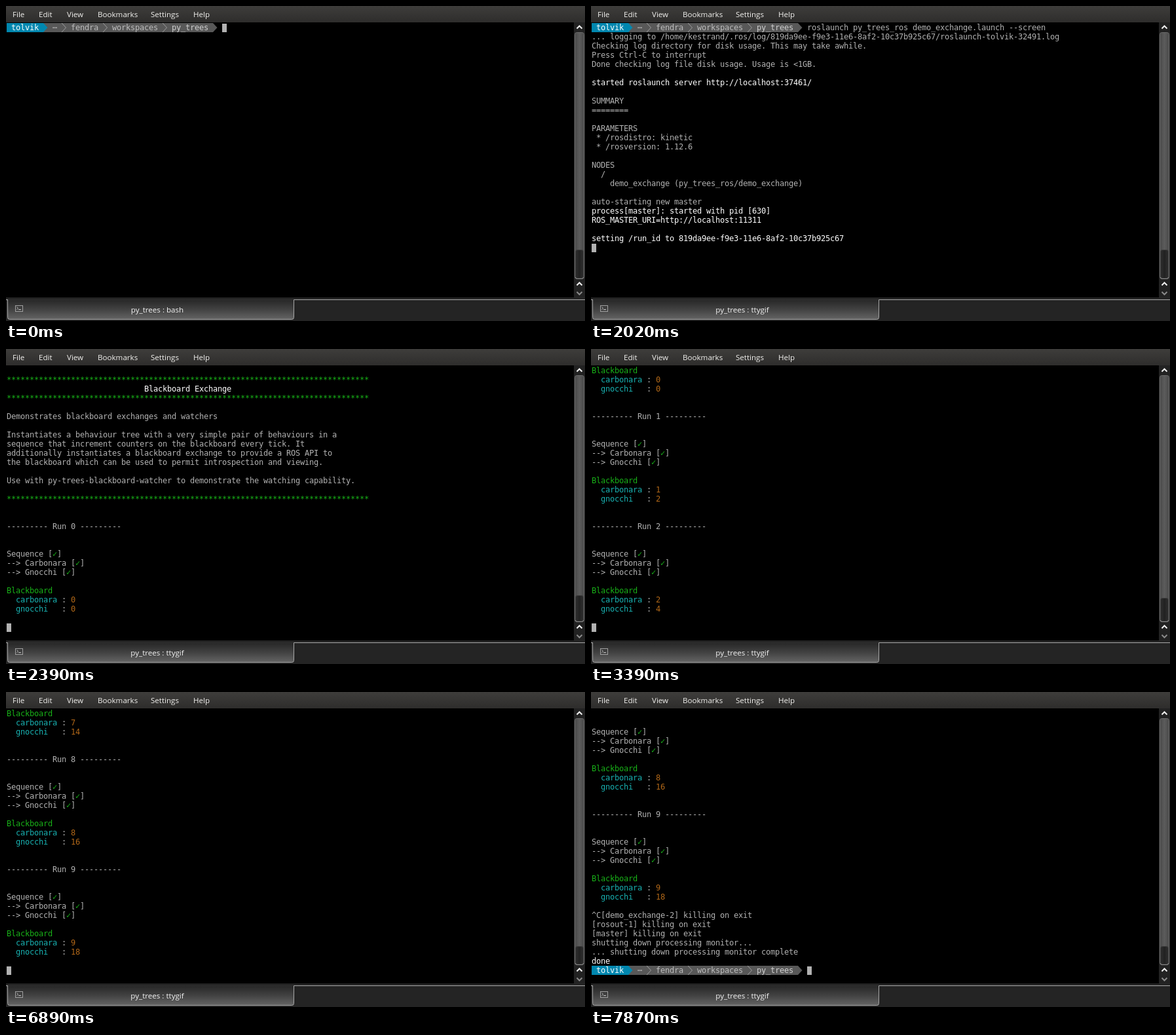
Recreate the animation shown at these times as an HTML page with a canvas. Size 884x481 px, loop 8000 ms.

```html
<!DOCTYPE html>
<html lang="en">
<head>
<meta charset="utf-8">
<title>Terminal session</title>
<style>
  html, body { margin: 0; width: 100%; height: 100%; overflow: hidden; background: #000; }
  canvas { display: block; }
</style>
</head>
<body>
<canvas id="stage" width="884" height="481"></canvas>
<script>
const ctx = document.getElementById('stage').getContext('2d');
const LOOP = 8000, ROWS = 29, CELL_W = 7, CELL_H = 14, LEFT = 1, TOP = 26;
const MONO = '12px "DejaVu Sans Mono", monospace';
const SANS = '11.6px "Open Sans", "Noto Sans", sans-serif';
const HOST = 'tolvik', FOLDER = 'fendra', HOME = 'kestrand';

// "~" plus a letter switches the text colour; "~P" draws the shell prompt.
const COLORS = { n: '#b2b2b2', w: '#ffffff', g: '#18b218', c: '#18b2b2', o: '#b26818' };
const PROMPT_COLS = 47;

const events = [[0, '~P']];
const add = (time, ...lines) => events.push([time, lines.join('\n')]);

const command = 'roslaunch py_trees_ros demo_exchange.launch --screen';
const KEYS = 9;
const typed = k => Math.round(command.length * k / KEYS);
for (let k = 0; k < KEYS; k++) add(350 + 100 * k, command.slice(typed(k), typed(k + 1)));

const runId = '819da9ee-f9e3-11e6-8af2-10c37b925c67';
const stars = '~g' + '*'.repeat(79);
add(1390, '', '');
add(1540, `... logging to /home/${HOME}/.ros/log/${runId}/roslaunch-${HOST}-32491.log`,
  'Checking log directory for disk usage. This may take awhile.',
  'Press Ctrl-C to interrupt', '');
add(1640, 'Done checking log file disk usage. Usage is <1GB.', '', '');
add(1730, '~wstarted roslaunch server http://localhost:37461/', '',
  'SUMMARY', '========', '',
  'PARAMETERS', ' * /rosdistro: kinetic', ' * /rosversion: 1.12.6', '',
  'NODES', '  /', '    demo_exchange (py_trees_ros/demo_exchange)', '', '');
add(1820, 'auto-starting new master', '~wprocess[master]: started with pid [630]', '');
add(2020, '~wROS_MASTER_URI=http://localhost:11311', '', `~wsetting /run_id to ${runId}`, '');
add(2100, '~wprocess[rosout-1]: started with pid [643]', 'started core service [/rosout]', '');
add(2180, '~wprocess[demo_exchange-2]: started with pid [650]', '');
add(2260, '', stars, ' '.repeat(30) + '~wBlackboard Exchange', stars, '',
  'Demonstrates blackboard exchanges and watchers', '',
  'Instantiates a behaviour tree with a very simple pair of behaviours in a',
  'sequence that increment counters on the blackboard every tick. It',
  'additionally instantiates a blackboard exchange to provide a ROS API to',
  'the blackboard which can be used to permit introspection and viewing.', '',
  'Use with py-trees-blackboard-watcher to demonstrate the watching capability.', '',
  stars, '', '');

for (let n = 0; n < 10; n++) {
  add(2390 + 500 * n, '', `--------- Run ${n} ---------`, '', '',
    'Sequence [~g✓~n]', '--> Carbonara [~g✓~n]', '--> Gnocchi [~g✓~n]', '',
    '~gBlackboard', `  ~ccarbonara ~n: ~o${n}`, `  ~cgnocchi   ~n: ~o${2 * n}`, '', '');
}

add(7040, '^C');
add(7100, '[demo_exchange-2] killing on exit', '');
add(7300, '[rosout-1] killing on exit', '');
add(7500, '[master] killing on exit', '');
add(7700, 'shutting down processing monitor...',
  '... shutting down processing monitor complete', '~wdone', '');
add(7870, '~P');

const cellX = col => LEFT + col * CELL_W;

function rect(x, y, w, h, fill) {
  ctx.fillStyle = fill;
  ctx.fillRect(x, y, w, h);
}

function path(points, color, width) {
  ctx.beginPath();
  points.forEach(([x, y]) => ctx.lineTo(x, y));
  if (width) {
    ctx.strokeStyle = color;
    ctx.lineWidth = width;
    ctx.stroke();
  } else {
    ctx.fillStyle = color;
    ctx.fill();
  }
}

function roundBox(x, y, w, h, radii, fill, stroke) {
  ctx.beginPath();
  ctx.roundRect(x, y, w, h, radii);
  ctx.fillStyle = fill;
  ctx.fill();
  ctx.strokeStyle = stroke;
  ctx.lineWidth = 1;
  ctx.stroke();
}

function gradient(x0, y0, x1, y1, ...colors) {
  const g = ctx.createLinearGradient(x0, y0, x1, y1);
  colors.forEach((c, i) => g.addColorStop(i / (colors.length - 1), c));
  return g;
}

function cells(text, col, y, color) {
  ctx.fillStyle = color;
  for (const ch of text) {
    if (ch !== ' ') ctx.fillText(ch, cellX(col), y + 11);
    col++;
  }
}

function drawPrompt(y) {
  const arrow = (col, color, width) => {
    const x = cellX(col);
    path([[x, y], [x + 6.5, y + 7], [x, y + 14]], color, width);
  };
  rect(cellX(0), y, 8 * CELL_W, CELL_H, '#0087af');
  rect(cellX(8), y, 37 * CELL_W, CELL_H, '#585858');
  arrow(8, '#0087af');
  arrow(45, '#585858');
  [12, 21, 34].forEach(col => arrow(col, '#9e9e9e', 1));
  cells(HOST, 1, y, '#ffffff');
  cells('⋯', 10, y, '#bcbcbc');
  cells(FOLDER, 14, y, '#bcbcbc');
  cells('workspaces', 23, y, '#bcbcbc');
  cells('py_trees', 36, y, '#d0d0d0');
}

// Returns the column after the last character.
function drawLine(line, y) {
  let col = 0, color = COLORS.n;
  line.split('~').forEach((part, i) => {
    if (i) {
      const key = part[0];
      part = part.slice(1);
      if (key === 'P') {
        drawPrompt(y);
        col = PROMPT_COLS;
      } else {
        color = COLORS[key];
      }
    }
    cells(part, col, y, color);
    col += part.length;
  });
  return col;
}

function drawMenu() {
  rect(0, 0, 884, 25, gradient(0, 0, 0, 25, '#3e3d3b', '#2e2d2c'));
  ctx.font = SANS;
  ctx.fillStyle = '#f2f1ee';
  const items = { File: 10, Edit: 50, View: 93, Bookmarks: 140, Settings: 221, Help: 286 };
  for (const name in items) ctx.fillText(name, items[name], 17);
}

function drawScrollbar(scrolled) {
  const chevron = (y, dir, color) =>
    path([[871.5, y + 2 * dir], [875.5, y - 2 * dir], [879.5, y + 2 * dir]], color, 2);
  rect(867, 25, 17, 420, '#222222');
  roundBox(868.5, 40.5, 14, 376, 3, gradient(868, 0, 883, 0, '#484848', '#5c5c5c', '#484848'), '#6c6c6c');
  const size = 374 * ROWS / (218 + ROWS + scrolled);
  const top = Math.round(416 - size);
  roundBox(869.5, top + 0.5, 12, 415 - top, 3, gradient(869, 0, 882, 0, '#303030', '#222222', '#303030'), '#3c3c3c');
  path([[869, 414], [871, 416.5], [880, 416.5], [882, 414]], '#8a8a8a', 1);
  chevron(32.5, 1, '#f0f0f0');
  chevron(424.5, 1, '#f0f0f0');
  chevron(438.5, -1, '#8a8a8a');
}

function drawTab(title) {
  rect(0, 445, 884, 36, '#242424');
  rect(440, 448, 444, 1, '#a8a8a8');
  roundBox(2.5, 448.5, 437, 30, [0, 0, 3, 3], gradient(0, 448, 0, 479, '#262626', '#424242', '#666666'), '#a8a8a8');
  rect(3, 448, 436, 1, '#303030');
  rect(0, 448, 3, 1, '#a8a8a8');
  ctx.strokeStyle = '#a0a0a0';
  ctx.lineWidth = 1;
  ctx.strokeRect(14.5, 457.5, 11, 9);
  path([[16.5, 459.5], [18.5, 461.5], [16.5, 463.5]], '#c0c0c0', 1);
  rect(19, 463, 4, 1, '#c0c0c0');
  ctx.font = SANS;
  ctx.fillStyle = '#f4f4f4';
  ctx.textAlign = 'center';
  ctx.fillText(title, 231, 467.5);
  ctx.textAlign = 'left';
}

function draw(t) {
  const lines = events.filter(e => e[0] <= t).map(e => e[1]).join('').split('\n');
  const scrolled = Math.max(0, lines.length - ROWS);
  rect(0, 0, 884, 481, '#000000');
  ctx.font = MONO;
  let col = 0, y = TOP;
  lines.slice(scrolled).forEach((line, row) => {
    y = TOP + row * CELL_H;
    col = drawLine(line, y);
  });
  rect(cellX(col), y + 1, CELL_W, CELL_H - 1, COLORS.n);
  drawMenu();
  drawScrollbar(scrolled);
  drawTab(t < 350 ? 'py_trees : bash' : 'py_trees : ttygif');
}

const start = performance.now();
function tick() {
  draw((performance.now() - start) % LOOP);
  requestAnimationFrame(tick);
}
tick();
</script>
</body>
</html>
```
